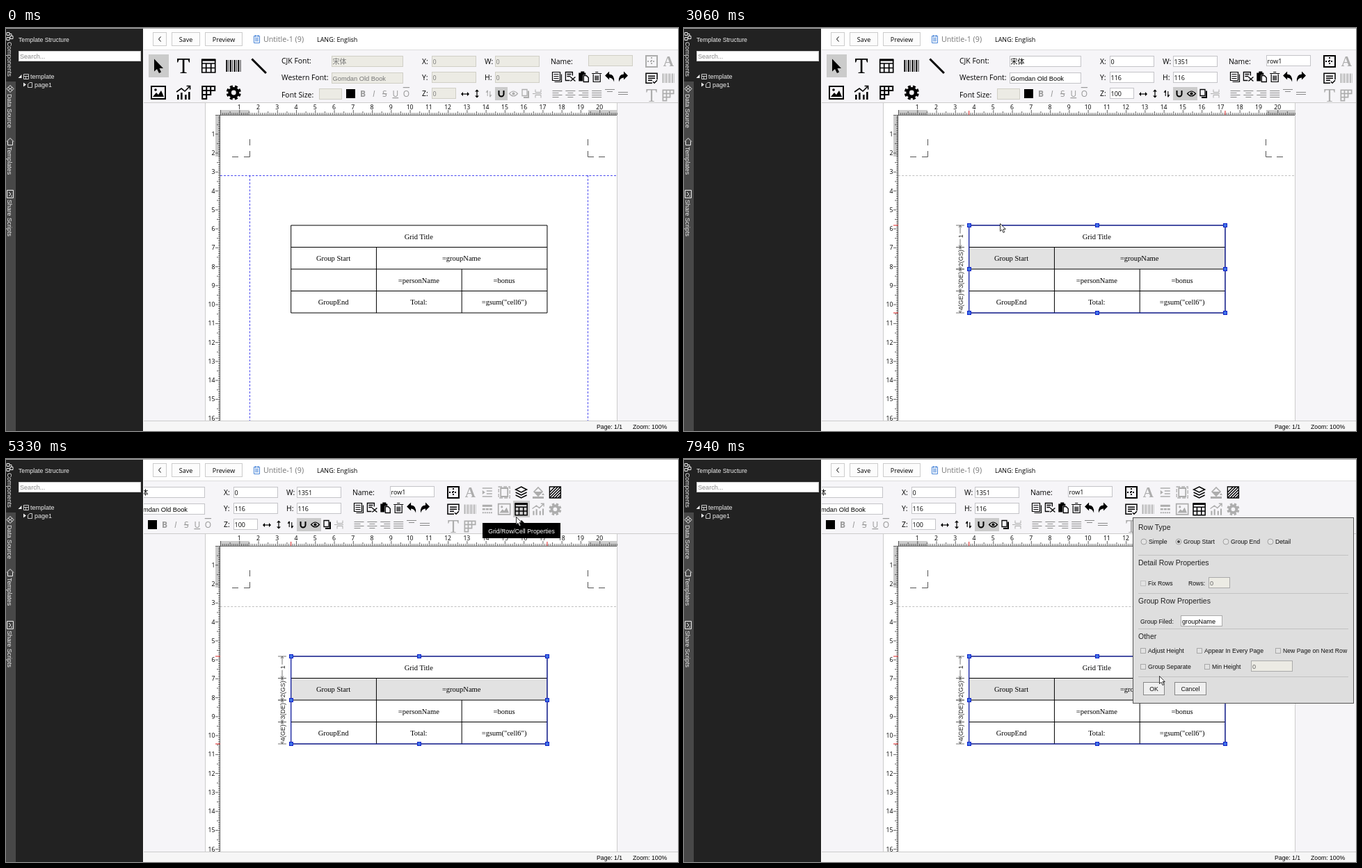
Recreate the animation shown at these times as an HTML page. Size 966 px wide and 580 px high, loop 8 s.

```html
<!DOCTYPE html>
<html lang="en">
<head>
<meta charset="utf-8">
<title>Template editor</title>
<style>
html, body { margin: 0; width: 100%; height: 100%; overflow: hidden; background: #fff; }
svg { display: block; width: 966px; height: 580px; }
text { font-family: "Liberation Sans", Arial, sans-serif; white-space: pre; }
.ui { font-family: "Open Sans", "Noto Sans", sans-serif; }
.cjk { font-family: "Noto Sans CJK SC", "Noto Sans CJK", sans-serif; }
.serif { font-family: "Liberation Serif", serif; }
.mid { text-anchor: middle; }
.end { text-anchor: end; }
</style>
</head>
<body>
<svg id="stage" viewBox="0 0 966 580"></svg>
<script>
const INK = '#000', DIM = '#adadad', BLUE = '#1020c8', GUIDE = '#3030ee';

// Drawing helpers; each returns SVG markup
const text = (x, y, s, size = 8.7, fill = INK, cls = '', more = '') =>
  `<text x="${x}" y="${y}" font-size="${size}" fill="${fill}" class="${cls}" ${more}>${s}</text>`;
const rect = (x, y, w, h, fill, stroke) => stroke
  ? `<rect x="${x + .5}" y="${y + .5}" width="${w - 1}" height="${h - 1}" fill="${fill}" stroke="${stroke}"/>`
  : `<rect x="${x}" y="${y}" width="${w}" height="${h}" fill="${fill}"/>`;
const line = (d, stroke = INK, w = 1, more = '') =>
  `<path d="${d}" fill="none" stroke="${stroke}" stroke-width="${w}" ${more}/>`;
const shape = (d, fill = INK) => `<path d="${d}" fill="${fill}"/>`;
const circle = (x, y, r, fill, stroke = 'none', more = '') =>
  `<circle cx="${x}" cy="${y}" r="${r}" fill="${fill}" stroke="${stroke}" ${more}/>`;
const at = (x, y, body, k = 1) => `<g transform="translate(${x} ${y}) scale(${k})">${body}</g>`;
const turned = (x, y, angle, s, size, fill, cls) =>
  `<g transform="translate(${x} ${y}) rotate(${angle})">${text(0, 0, s, size, fill, cls)}</g>`;

// Icons, centred on 0,0
const icon = {
  pick: c => shape('M-6-10V8L-2 4.5L1 10.5L4 9L1.5 3.5H7Z', c),
  type: c => shape('M-9-10.5H9V-5H8L6.5-8.8H1.3V9L4.5 9.6V10.5H-4.5V9.6L-1.3 9V-8.8H-6.5L-8-5H-9Z', c),
  table: c => line('M-9.5-9H9.5V9.5H-9.5ZM-9.5-3.5H9.5M-9.5 3H9.5M-3.5-3.5V9.5M3.5-3.5V9.5', c, 1.7) +
    shape('M-10-10H10V-7H-10Z', c),
  bars: c => line('M-11 0H11', c, 17, 'stroke-dasharray="2 1.4 .8 1.4 2 1.4 .8 1.6"'),
  slash: c => line('M-10-10L10.5 10.5', c, 3),
  image: c => line('M-10-9H10V9H-10Z', c, 2) + shape('M-8 6L-3 0L0 3L4-3L8 6Z', c) + circle(-4, -4, 1.8, c),
  chart: c => shape('M-9 3H-6.5V10H-9ZM-4 0H-1.5V10H-4ZM2 3H4.5V10H2ZM7-1H9.5V10H7Z', c) +
    line('M-10-1L-3-6L2-2L9-9M4.5-9.5H9.5V-4.5', c, 1.6),
  cells: c => line('M-9-9H9V-3H-9ZM-9-3H3V3H-9ZM-9 3H-3V9H-9ZM-3-9V3M3-9V-3', c, 2),
  gear: c => circle(0, 0, 5.7, 'none', c, 'stroke-width="4.6"') +
    circle(0, 0, 9, 'none', c, 'stroke-width="3.2" stroke-dasharray="4 3.07" transform="rotate(9)"'),
  border: c => line('M-8-8H8V8H-8Z', c, 2) + line('M0-6V6M-6 0H6', c, 2, 'stroke-dasharray="2 2"'),
  letter: c => text(0, 7, 'A', 21, c, 'serif mid', 'font-weight="bold"'),
  form: c => line('M8 2V-7H-8V7H1M-5-3H5M-5 0H5M-5 3H1M2 5L4 7L8 3', c, 1.5),
  indent: c => line('M-7-6H7M-1-2H7M-1 2H7M-7 6H7', c, 1.5) + shape('M-7-3L-3 0L-7 3Z', c),
  frame: c => line('M-5-6H5V6H-5Z', c, 1.8) + line('M-8-8H8V8H-8Z', c, 1.3, 'stroke-dasharray="5 2"'),
  layers: c => line('M0-8L8-4L0 0L-8-4ZM-8 0L0 4L8 0M-8 4L0 8L8 4', c, 1.5),
  bucket: c => line('M-6-1L0-7L6-1L0 5Z', c, 1.6) + shape('M-6-1H6L0 5ZM7 1L9 4H5ZM-8 6H8V9H-8Z', c),
  hatch: c => line('M-8-8H8V8H-8ZM-8 0L0-8M-8 4L4-8M-8 8L8-8M-4 8L8-4M0 8L8 0M4 8L8 4', c, 1.4),
  dashes: c => line('M-7-5H7', c, 3) + line('M-7 0H7', c, 2.5, 'stroke-dasharray="4 1"') +
    line('M-7 5H7', c, 2, 'stroke-dasharray="2 1"'),
  copy: c => line('M-7-7H4V5H-7ZM6-4V7H-4M-5-4H2M-5-1H2M-5 2H2', c, 1.2),
  cut: c => line('M3-2V-7H-7V5H-1M-5-4H1M-5-1H0M0 0L7 6M0 6L7 0', c, 1.3),
  paste: c => shape('M-7-6H-4V-8H1V-6H3V-3H-1V6H-7Z', c) + line('M0-2H4L7 1V7H0Z', c, 1.3),
  bin: c => line('M-5-4V7H5V-4M-7-5H7M-2-7H2M-2-2V5M0-2V5M2-2V5', c, 1.2),
  undo: c => shape('M-7-2L-1-8V-4Q7-4 6 7Q4 1-1 1V4Z', c),
  wide: c => line('M-5 0H5', c, 1.2) + shape('M-6 0L-3-3V3ZM6 0L3-3V3Z', c),
  tall: c => line('M0-5V5', c, 1.2) + shape('M0-6L-3-3H3ZM0 6L-3 3H3Z', c),
  swap: c => line('M-2-5V4M2 5V-4', c, 1.2) + shape('M-2-6L-5-2H-1ZM2 6L5 2H1Z', c),
  magnet: c => line('M-3.5-5V0A3.5 3.5 0 0 0 3.5 0V-5', c, 2),
  eye: c => line('M-6 0Q0-7 6 0Q0 7-6 0Z', c, 1.2) + circle(0, 0, 2, c),
  pages: c => line('M-4-6H3V3H-4Z', c, 1.3) + line('M5-4V5.5H-2', c, 2),
  split: c => line('M-3-6V-2H5V-6M-3 6V2H5V6M-7 0H6', c, 1),
};
const put = (name, x, y, c = INK, k = 1) => at(x, y, icon[name](c), k);

const field = (x, y, w, s, on, cls = 'ui', size = 9) =>
  rect(x, y, w, 16, on ? '#fff' : '#ecebe4', on ? '#c4c4c8' : '#d0cfc6') +
  text(x + 1.5, y + 11.5, s, size, on ? INK : '#777', cls);
const label = (x, y, s) => text(x, y, s, 10.4, INK, 'ui');

// Property values for nothing, grid and row selected
const values = [['0', '0', '0', '0', '0', ''],
  ['216', '262', '100', '1351', '463', 'grid1'],
  ['0', '116', '100', '1351', '116', 'row1']];

function toolbar(sel, hot) {
  const [x, y, z, w, h, name] = values[sel], on = sel > 0, c = on ? INK : DIM;
  let s = rect(205, 38, 29, 33, '#cbcbcb');
  ['pick', 'type', 'table', 'bars', 'slash'].forEach((n, i) => s += put(n, 219 + i * 36.1, 54.5));
  ['image', 'chart', 'cells', 'gear'].forEach((n, i) => s += put(n, 219 + i * 36.1, 93));
  s += label(396, 51, 'CJK Font:') + label(396, 75, 'Western Font:') + label(396, 100, 'Font Size:') +
    field(468, 40, 103, '宋体', on, 'cjk', 10) + field(468, 64, 103, 'Gomdan Old Book', on, '', 9.3) +
    field(450, 87, 33, '', false) + rect(489, 88, 13, 13, INK);
  [['B', 'font-weight="bold"'], ['I', 'font-style="italic"'], ['S', 'text-decoration="line-through"'],
    ['U', 'text-decoration="underline"'], ['O', 'text-decoration="overline"']]
    .forEach(([g, m], i) => s += text(513 + i * 15.6, 99, g, 12, '#999', 'ui mid', m));
  s += label(598, 52, 'X:') + label(598, 75, 'Y:') + label(598, 98, 'Z:') +
    label(688, 52, 'W:') + label(688, 75, 'H:') + label(783, 52, 'Name:') +
    field(612, 40, 64, x, on) + field(612, 63, 64, y, on) + field(612, 86, 35, z, on) +
    field(703, 40, 64, w, on) + field(703, 63, 64, h, on) + field(837, 39, 64, name, on);
  s += rect(703, 85, on ? 35 : 18, 19, '#cbcbcb') + put('wide', 660, 95) + put('tall', 677, 94.5) +
    put('swap', 694, 94.5, sel > 1 ? INK : DIM, .9) + put('magnet', 712, 95) +
    put('eye', 729.5, 94.5, c) + put('pages', 746, 94.5, c) + put('split', 764, 94.5, DIM);
  ['copy', 'cut', 'paste', 'bin', 'undo'].forEach((n, i) => s += put(n, 792.5 + i * 18.9, 70.5));
  s += `<g transform="translate(887 70.5) scale(-1 1)">${icon.undo(INK)}</g>`;
  for (let i = 0; i < 4; i++) {
    const a = [-7, -4, -2, -7][i], b = [2, 4, 7, 7][i];
    s += at(792.5 + i * 18.9, 95, line(`M-7-4.5H7M${a}-1.5H${b}M-7 1.5H7M${a} 4.5H${b}`, '#888', 1));
  }
  s += line('M861 88.5H875M864 91.5H872M880 92.5H894M880 95.5H894', '#888', 1);
  [['border', c], ['letter', DIM], ['indent', DIM], ['frame', DIM], ['layers', c], ['bucket', DIM], ['hatch', INK]]
    .forEach(([n, f], i) => s += put(n, 928 + i * 24.4, 48, f));
  if (hot) s += rect(1014, 60, 24, 24, '#cbcbcb');
  [['form', INK, 1], ['bars', DIM, .8], ['dashes', DIM, 1], ['image', DIM, .85], ['table', INK, .9],
    ['chart', DIM, .85], ['gear', DIM, .85]]
    .forEach(([n, f, k], i) => s += put(n, 928 + i * 24.4, 72.3, f, k));
  return s + put('type', 928, 97, DIM, .85) + put('cells', 952, 97, DIM, .85);
}

function sidebar() {
  const tab = (y, s) => turned(1.5, y, 90, s, 8.8, '#eee');
  return rect(0, 0, 197, 580, '#222') + rect(0, 77, 14, 503, '#484848') + rect(197, 32, 1, 548, '#fff') +
    tab(20, 'Components') + tab(95, 'Data Source') + tab(171, 'Templates') + tab(247, 'Share Scripts') +
    line('M1 6.5H5V10.5H1ZM6 11.5H10V15.5H6ZM1 13.5H5V17.5H1ZM5 8.5H8V11.5', '#eee') +
    line('M1 87.5L6 82.5L11 87.5L6 92.5ZM3 90L6 87L9 90M3 85L6 88L9 85', '#eee') +
    line('M1 163.5L6 158.5L11 163.5M2.5 163V168.5H9.5V163', '#eee') +
    line('M1.5 233.5H10.5V244.5H1.5ZM4 236L7 239L4 242M7 242H9', '#eee') +
    text(18, 20, 'Template Structure', 8.7, '#eee') + rect(18, 33, 176, 15, '#fff', '#ccc') +
    text(20, 44, 'Search...', 9.1, '#888') +
    shape('M22.5 67V72H17.5ZM25 78.5L29 81.5L25 84.5Z', '#eee') +
    line('M25.5 66.5H32.5V73.5H25.5ZM25.5 69.5H32.5M28.5 69.5V73.5', '#ddd', .9) +
    line('M34 78.5H37.5V85.5H31.5V81Z', '#ddd', .9) +
    text(35, 73, 'template', 9, '#eee') + text(41, 85, 'page1', 9, '#eee');
}

function header() {
  const button = (x, w, s) => rect(x, 6, w, 20, '#fcfcfc', '#ccc') + text(x + w / 2, 19.5, s, 9, INK, 'ui mid');
  return button(211, 20, '') + line('M222.5 12.5L219.5 16L222.5 19.5') +
    button(238, 41, 'Save') + button(286, 54, 'Preview') +
    line('M356.5 11.5H364.5V21.5H356.5ZM358 14.5H363M358 16.5H363M358 18.5H363M358.5 10V13M362.5 10V13', '#4a86d8') +
    text(370, 20, 'Untitle-1 (9)', 10.7, '#777', 'ui') + text(447, 20, 'LANG: English', 9, INK, 'ui');
}

function rulers() {
  const mm = 2.726;
  let s = rect(308, 118, 42, 7, '#ccc') + rect(837, 118, 41, 7, '#ccc') + rect(301, 126, 7, 59, '#ccc');
  let d = 'M308 125.5H878M307.5 125V566';
  for (let i = 0; i < 210; i++) {
    const len = i % 10 ? (i % 5 ? 3 : 5) : 7, x = 308.5 + i * mm, y = 125.5 + i * mm;
    d += `M${x} 125V${125 - len}`;
    if (i < 162) d += `M308 ${y}H${308 - len}`;
    if (i && i % 10 == 0) {
      s += text(x - .5, 117, i / 10, 8.7, INK, 'ui mid');
      if (i < 161) s += text(300.5, y + 3, i / 10, 8.7, INK, 'ui end');
    }
  }
  return s + line(d, '#222', .7);
}

const backdrop = rect(198, 0, 768, 580, '#fff') + rect(198, 32, 768, 534, '#f6f5f8') +
  rect(286, 108, 593, 458, '#fff') + line('M286.5 108V566M878.5 108V566', '#ccc') + rulers() +
  line('M350.5 160V169M350.5 177V185.5H342M334 185.5H325M836.5 160V169M836.5 177V185.5H845M852 185.5H861', '#555');
const chrome = sidebar() + header() + line('M0 .5H966', '#aaa') +
  line('M198 31.5H966', '#ddd') + line('M198 107.5H966', '#ccc') +
  rect(198, 566, 768, 14, '#f6f6f6') + line('M198 565.5H966', '#ccc') +
  text(849, 576.5, 'Page: 1/1') + text(901, 576.5, 'Zoom: 100%');

const row = i => 284 + i * 31.5, col = i => 409.7 + i * 122.75;

function grid(shown, rowOn) {
  const cell = (c, r, s) => text(col(c) - .5, row(r) + 19.5, s, 10.5, INK, 'serif mid');
  const frame = `M${col(0)} ${row(0)}H${col(3)}V${row(4)}H${col(0)}Z`;
  let s = (rowOn ? rect(col(0), row(1), 368, 31.5, '#e2e2e2') : '') +
    line(frame + [1, 2, 3].map(r => `M${col(0)} ${row(r)}H${col(3)}`).join('') +
      `M${col(1)} ${row(1)}V${row(4)}M${col(2)} ${row(2)}V${row(4)}`) +
    cell(1.5, 0, 'Grid Title') + cell(.5, 1, 'Group Start') + cell(2, 1, '=groupName') +
    cell(1.5, 2, '=personName') + cell(2.5, 2, '=bonus') +
    cell(.5, 3, 'GroupEnd') + cell(1.5, 3, 'Total:') + cell(2.5, 3, '=gsum("cell6")');
  if (!shown) return s;
  s += line(frame, BLUE) +
    line(`M301 ${row(0)}H308M301 ${row(4)}H308M${col(0)} 119V125M${col(3)} 119V125`, '#e02020');
  for (const c of [0, 1.5, 3]) for (const r of [0, 2, 4])
    if (c != 1.5 || r != 2) s += rect(Math.round(col(c)) - 3, row(r) - 3, 6, 6, '#3f74e8', BLUE);
  ['1', '2(GS)', '3(DE)', '4(GE)'].forEach((n, i) => {
    const a = row(i), b = row(i + 1), m = (a + b) / 2, gap = i ? 12 : 4;
    s += line(`M391 ${a}H403M391 ${b}H403M397 ${a}V${m - gap}M397 ${b}V${m + gap}` +
      `M395 ${a + 3}L397 ${a}L399 ${a + 3}M395 ${b - 3}L397 ${b}L399 ${b - 3}`, '#555', .8) +
      turned(400.5, m, -90, n, 9, '#222', 'mid');
  });
  return s;
}

const dotted = (d, color) => line(d, color, .9, 'stroke-dasharray="2.9 2.2"');
const guides = rowOn => dotted('M308 212.5H878', rowOn ? '#b8b8b8' : GUIDE) +
  (rowOn ? '' : dotted('M350.5 212V566M836.5 212V566', GUIDE));

const tip = (x, y, w, s) => rect(x, y, w, 22, INK) +
  shape(`M${x + w / 2 - 4} ${y}L${x + w / 2} ${y - 4}L${x + w / 2 + 4} ${y}Z`) +
  text(x + w / 2, y + 14.5, s, 8.7, '#fff', 'mid');

function dialog() {
  const small = (x, y, s, cls) => text(x, y, s, 8.7, '#111', cls);
  const radio = (x, s, on) => circle(x, 119, 4, '#e4e4e4', '#a0a0a0') + (on ? circle(x, 119, 2, '#444') : '') +
    small(x + 7, 122, s);
  const check = (x, y, s, edge = '#a8a8a8') => rect(x, y - 7, 8, 8, '#e2e2e2', edge) + small(x + 11, y, s);
  const input = (x, y, w, s, on) => rect(x, y, w, 16, on ? '#fff' : '#ecebe4', '#aaa') +
    text(x + 2, y + 11.5, s, 9.2, on ? INK : '#666');
  const title = (y, s) => text(653, y, s, 10.5, '#222');
  const button = (x, w, s) => rect(x, 321, w, 19, '#efefef', '#888') + small(x + w / 2, 334, s, 'mid');
  return rect(645, 84, 318, 268, '#dedede', '#555') +
    line('M653 138.5H955M653 193.5H955M653 244.5H955M653 313.5H955', '#c2c2c2') +
    title(102, 'Row Type') + title(153, 'Detail Row Properties') +
    title(208, 'Group Row Properties') + title(259, 'Other') +
    radio(661, 'Simple') + radio(711, 'Group Start', true) + radio(779, 'Group End') + radio(843, 'Detail') +
    check(656, 182, 'Fix Rows', '#c0c0c0') + small(725, 182, 'Rows:') + input(754, 170, 31, '0') +
    small(656, 237, 'Group Filed:') + input(714, 225, 60, 'groupName', true) +
    check(656, 279, 'Adjust Height') + check(737, 279, 'Appear In Every Page') + check(850, 279, 'New Page on Next Row') +
    check(656, 302, 'Group Separate') + check(748, 302, 'Min Height') + input(815, 290, 60, '0') +
    button(660, 31, 'OK') + button(705, 46, 'Cancel');
}

// Pointer path: time, x, y
const path = [[450, 599, 415], [590, 588, 409], [720, 552, 389], [840, 506, 361], [950, 480, 345],
  [1585, 474, 343], [1710, 455, 337], [1835, 432, 329], [1960, 417, 323], [2085, 409, 320], [2210, 407, 319],
  [2940, 418, 317], [3060, 454, 281], [3200, 584, 195], [3340, 650, 147], [3460, 690, 113], [3580, 707, 97],
  [3700, 713, 89], [3820, 714, 86], [4700, 724, 88], [4830, 733, 83],
  [5820, 737, 88], [5945, 745, 100], [6070, 747, 111], [6195, 736, 117], [6320, 724, 118], [6440, 717, 118],
  [6570, 714, 122], [7440, 713, 134], [7565, 705, 180], [7690, 694, 242], [7815, 686, 292], [7940, 683, 312]];
const clicks = [[1200, 1320], [2700, 2820], [5200, 5330], [6800, 7070]];

function pointer(t) {
  const p = path.filter(k => k[0] <= t).pop();
  if (!p) return '';
  const arrow = t >= 2320 && t < 2940, [, x, y] = p;
  const ring = clicks.some(([a, b]) => t >= a && t < b)
    ? circle(arrow ? 411 : x, arrow ? 327 : y, 8.5, 'none', '#888') : '';
  return ring + (arrow ? shape('M407 326H411V323L416 327L411 331V328.5H407Z')
    : at(x, y, '<path d="M.5.5V11.5L3 9.2L5 13.5L6.8 12.7L5 8.5H8.3Z" fill="#fff" stroke="#222" stroke-width=".9"/>'));
}

function scene(t) {
  const rowOn = t >= 2820, sel = rowOn ? 2 : +(t >= 1320);
  const hot = t >= 4830 && t < 5450, shift = t >= 4320 ? -285 : 0;
  return backdrop + guides(rowOn) + grid(t >= 1460, rowOn) +
    `<g transform="translate(${shift} 0)">${toolbar(sel, hot)}</g>` + chrome +
    (t >= 3950 && t < 4200 ? tip(666, 111, 93, 'Snap to Grid/Widget') : '') +
    (t >= 4950 && t < 5450 ? tip(685, 92, 112, 'Grid/Row/Cell Properties') : '') +
    (t >= 5450 ? dialog() : '') + pointer(t);
}

const stage = document.getElementById('stage');
let last = '';
function tick() {
  const next = scene(performance.now() % 8000);
  if (next !== last) stage.innerHTML = last = next;
  requestAnimationFrame(tick);
}
tick();
</script>
</body>
</html>
```
